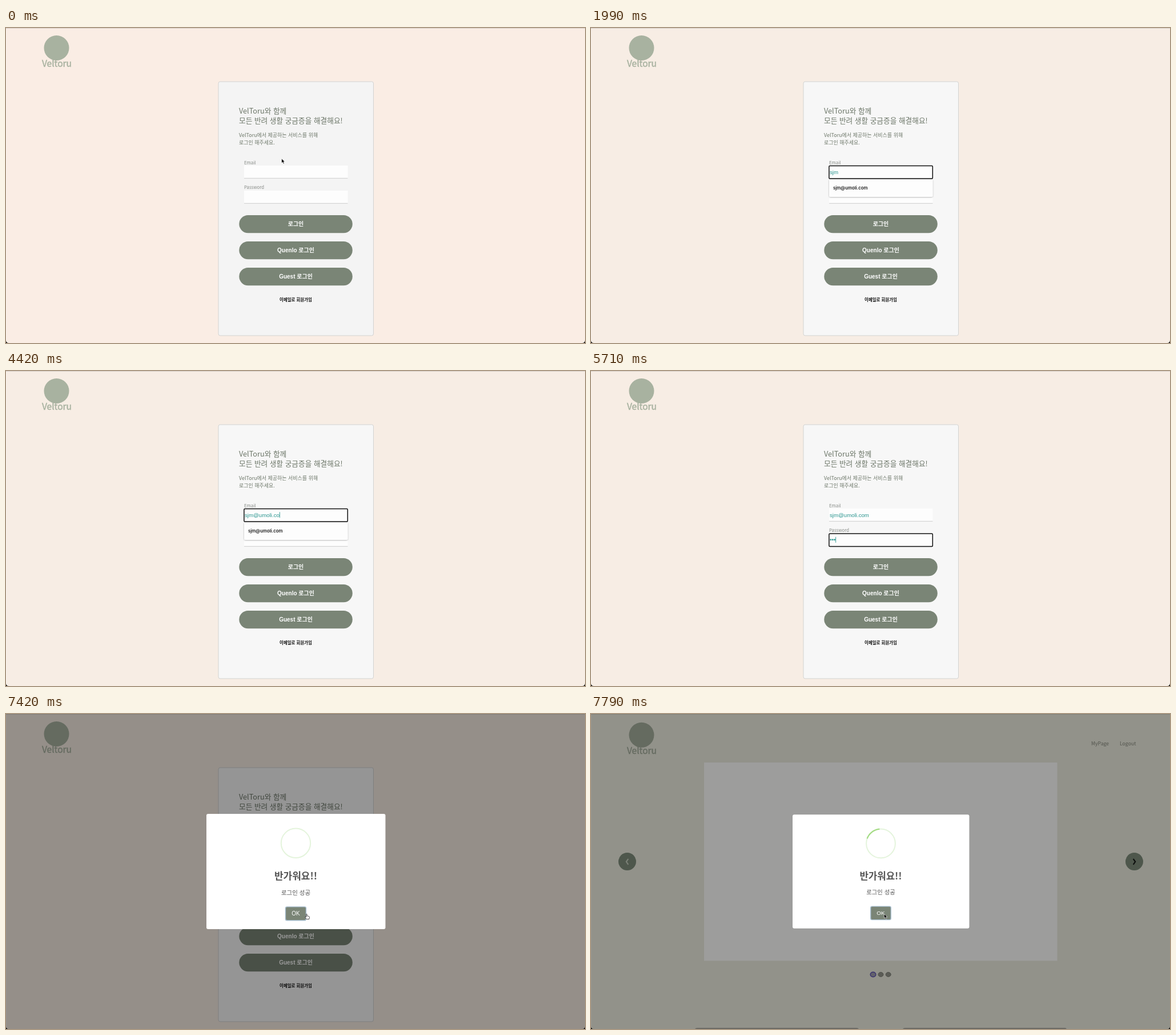
An HTML page for the animation above (7.99 s loop, 1014 by 552 pixels).

```html
<!DOCTYPE html>
<html lang="ko">
<head>
<meta charset="utf-8">
<title>Login</title>
<style>
  html, body { margin: 0; width: 100%; height: 100%; overflow: hidden; background: #000; }
  svg { display: block; width: 1014px; height: 552px; }
  text { font-family: "Noto Sans CJK KR", "Noto Sans CJK", "Noto Sans", sans-serif; white-space: pre; }
  .mid { text-anchor: middle; }
  .head { font-size: 12.7px; fill: #6d7769; }
  .sub { font-size: 8.97px; fill: #6d7769; }
  .label { font-size: 7.8px; fill: #868a86; }
  .btn { font: bold 10px "Liberation Sans", "Noto Sans CJK KR", "Noto Sans CJK", sans-serif; fill: #fff; }
  .typed { font: 9.68px "Liberation Sans", sans-serif; fill: #2a958f; }
  .item { font: 600 7.8px Inter, sans-serif; fill: #1c1c1c; }
  .nav { font-size: 8.7px; fill: #52544d; }
</style>
</head>
<body>
<svg viewBox="0 0 1014 552">
  <defs>
    <filter id="soft" x="-10%" y="-20%" width="120%" height="150%">
      <feDropShadow dx="0" dy=".6" stdDeviation=".9" flood-opacity=".35"/>
    </filter>
    <clipPath id="win"><path d="M0 0H1014V547Q1014 552 1009 552H5Q0 552 0 547Z"/></clipPath>
  </defs>
  <rect width="1014" height="552" fill="#000"/>
  <g clip-path="url(#win)">
    <rect id="bg" width="1014" height="552"/>
    <path d="M0 .5H1014" stroke="#000" stroke-opacity=".13"/>
    <path d="M.5 1V552" stroke="#fff" stroke-opacity=".4"/>

    <g id="logo" fill="#a8b2a0">
      <circle cx="88.5" cy="35" r="22"/>
      <text class="mid" x="89" y="68" font-size="15.5" stroke="#a8b2a0" stroke-width=".45">Veltoru</text>
    </g>

    <g id="login">
      <rect id="card" x="372" y="94" width="271.5" height="445" rx="3" stroke="#d2d3d2"/>
      <text class="head" x="408" y="150.3">VelToru와 함께</text>
      <text class="head" x="408" y="167.2">모든 반려 생활 궁금증을 해결해요!</text>
      <text class="sub" x="408" y="190.8">VelToru에서 제공하는 서비스를 위해</text>
      <text class="sub" x="408" y="204">로그인 해주세요.</text>
      <text class="label" x="417" y="238.8">Email</text>
      <text class="label" x="417" y="282.2">Password</text>
      <g id="fields"></g>
      <text id="mail" class="typed" x="418" y="255.6"></text>
      <g id="dots" fill="#2a958f"></g>
      <g id="buttons"></g>
      <text class="mid" x="507.5" y="478.9" font-size="7.45" font-weight="700" fill="#111">이메일로 회원가입</text>
      <g id="menu">
        <rect id="sheet" x="417" y="265" width="181.5" rx="2.5" fill="#fdfdfd" filter="url(#soft)"/>
        <g id="items"></g>
      </g>
      <rect id="ring" x="416.9" width="181.4" height="22.5" rx="1.5" fill="none" stroke="#101010" stroke-width="1.5"/>
      <rect id="caret" width=".9" height="10" fill="#2a958f"/>
    </g>

    <rect id="shade" width="1014" height="552" fill="#000" fill-opacity=".4"/>

    <rect id="panel" x="198" y="85" width="618.5" height="347.5" fill="#9d9d9c"/>
    <g id="home">
      <text class="nav" x="876" y="55.2">MyPage</text>
      <text class="nav" x="926" y="55.2">Logout</text>
      <g fill="#4e574c">
        <circle cx="63.5" cy="258.5" r="15.5"/>
        <circle cx="951.5" cy="258.5" r="15.5"/>
      </g>
      <g fill="none" stroke-width="2.1">
        <path d="M65.3 253.8L61.8 258.8L65.3 263.8" stroke="#7b8077"/>
        <path d="M949.7 253.8L953.2 258.8L949.7 263.8" stroke="#0d0f0d"/>
      </g>
      <g fill="#5b5c56" stroke="#4e504a">
        <ellipse cx="494" cy="456.5" rx="4.8" ry="4.2" fill="#62616b" stroke="#37306f" stroke-width="1.4"/>
        <ellipse cx="507.5" cy="456.5" rx="4.5" ry="3.9"/>
        <ellipse cx="520.7" cy="456.5" rx="4.5" ry="3.9"/>
      </g>
      <path d="M182 552Q183 550 186 550H465Q468 550 469 552ZM546 552Q547 550 550 550H830Q832 550 833 552Z" fill="#6b6a65"/>
    </g>

    <g id="modal">
      <rect x="351" y="175" width="313.5" height="202" rx="3" fill="#fff"/>
      <circle cx="507.5" cy="226.3" r="25.7" fill="none" stroke="#e4f4dc" stroke-width="2"/>
      <path id="arc" d="M483.3 217.6A25.7 25.7 0 0 1 505.3 200.7" fill="none" stroke="#a5dc86" stroke-width="2.3"/>
      <text class="mid" x="507.5" y="290.2" font-size="17" font-weight="700" fill="#555">반가워요!!</text>
      <text class="mid" x="507.5" y="316.9" font-size="10.5" fill="#545454">로그인 성공</text>
      <rect x="488.8" y="337.2" width="37.4" height="25.2" rx="3" fill="#a9bfd0"/>
      <rect x="490.2" y="338.6" width="34.6" height="22.4" rx="2" fill="#7a8576"/>
      <text class="mid" x="507.5" y="353.4" style="font:10px 'Liberation Sans',sans-serif" fill="#fff">OK</text>
    </g>

    <path id="arrow" d="M0 0V7.6L1.8 6L3.1 9L4.5 8.4L3.2 5.5H5.5Z" fill="#000" stroke="#fff" stroke-width=".6"/>
    <path id="beam" d="M-1.5 -5Q0 -5 0 -4Q0 -5 1.5 -5M0 -4V4M-1.5 5Q0 5 0 4Q0 5 1.5 5" fill="none" stroke="#333" stroke-width=".8"/>
    <path id="hand" d="M-1.4 1V-4.2Q-.7 -5.2 0 -4.2V-1.2L3.4 -.4Q4.6 0 4.3 1.4L3.6 4.6H-.8L-3.4 1.2Q-3.3 0 -2.2 .3Z" fill="#fff" stroke="#222" stroke-width=".8" stroke-linejoin="round"/>
  </g>
</svg>
<script>
const LOOP = 7990;
const $ = id => document.getElementById(id);
const show = (id, on) => $(id).setAttribute('display', on ? 'inline' : 'none');
const set = (id, attrs) => { for (const k in attrs) $(id).setAttribute(k, attrs[k]); };
const showFirst = (id, n) =>
  [...$(id).children].forEach((d, i) => d.setAttribute('display', i < n ? 'inline' : 'none'));
const within = (t, a, b) => t >= a && t < b;
// Latest [time, ...values] step that has begun
const at = (steps, t) => steps.filter(s => s[0] <= t).pop();

const ADDRESS = 'sjm@umoli.com';
const PEOPLE = ['sjm', 'sdc', 'hana7', 'borim', 'tester', 'dalbit'];

const CHARS = [[0, 0], [990, 1], [1270, 2], [1420, 3], [2560, 4], [3140, 5], [3270, 6], [3420, 7],
  [3710, 8], [3990, 9], [4140, 10], [4420, 12], [4560, 13]];
const DOTS = [[0, 0], [5270, 1], [5420, 2], [5710, 3], [5990, 4], [6140, 5]];
const ROWS = [[0, 0], [270, 6], [990, 2], [1270, 1], [4710, 0]];
const CARET_OFF = [[710, 990], [1990, 2420], [6710, 7130]];
const SCALE = [[0, 1], [7560, 0.94], [7710, 0.987]];
const POINTER = [[0, 'arrow', 482.7, 229], [140, 'beam', 484, 246], [990, ''],
  [6850, 'arrow', 494, 272], [6990, 'arrow', 514, 322], [7130, 'arrow', 525, 346],
  [7270, 'arrow', 527, 349.3], [7420, 'hand', 527.2, 355], [7710, 'arrow', 513.4, 350.3]];

$('fields').innerHTML = [241, 285].map(y =>
  `<rect x="417" y="${y}" width="181.5" height="22.5" fill="#fdfdfd"/>
   <rect x="417" y="${y + 21.8}" width="181.5" height=".9" fill="#c6c7c6"/>`).join('');
$('buttons').innerHTML = ['로그인', 'Quenlo 로그인', 'Guest 로그인'].map((s, i) => {
  const y = 328 + 46 * i;
  return `<rect x="408.3" y="${y}" width="198.5" height="31.2" rx="15.6" fill="#7a8576"/>
    <text class="btn mid" x="507.5" y="${y + 18.6}">${s}</text>`;
}).join('');
$('items').innerHTML = PEOPLE.map((s, i) =>
  `<text class="item" x="424" y="${283.3 + 21.5 * i}">${s}@umoli.com</text>`).join('');
$('dots').innerHTML = [0, 1, 2, 3, 4].map(i =>
  `<circle cx="${419.8 + 3.4 * i}" cy="295.7" r="1.35"/>`).join('');

function drawForm(t) {
  const count = at(DOTS, t)[1], rows = at(ROWS, t)[1];
  $('mail').textContent = ADDRESS.slice(0, at(CHARS, t)[1]);
  showFirst('dots', count);

  show('menu', rows > 0);
  set('sheet', { height: 9.5 + 21.5 * rows });
  showFirst('items', rows);

  const second = t >= 4710, focus = within(t, 140, 7270);
  show('ring', focus);
  set('ring', { y: second ? 285 : 241.6 });
  show('caret', focus && !CARET_OFF.some(([a, b]) => within(t, a, b)));
  const x = second ? 418 + 3.4 * count
    : 418 + ($('mail').textContent ? $('mail').getComputedTextLength() : 0);
  set('caret', { x, y: second ? 290.8 : 247.2 });
}

function draw(t) {
  const modal = t >= 7420, left = t >= 7710, home = t >= 7790;
  set('bg', { fill: left ? '#f3f2e6' : t < 140 ? '#faede4' : '#f7ede4' });
  set('card', { fill: t < 140 ? '#f4f4f4' : '#f7f7f7' });
  set('logo', { transform: `translate(0 ${home ? 1.8 : 0})` });
  show('login', !left);
  if (!left) drawForm(t);
  show('shade', modal);
  show('panel', left);
  show('home', home);
  show('modal', modal);
  show('arc', home);
  set('modal', { transform: `translate(507.5 276) scale(${at(SCALE, t)[1]}) translate(-507.5 -276)` });

  const [, kind, x, y] = at(POINTER, t);
  for (const id of ['arrow', 'beam', 'hand']) show(id, id === kind);
  if (kind) set(kind, { transform: `translate(${x} ${y})` });
}

const start = performance.now();
function tick() {
  draw((performance.now() - start) % LOOP);
  requestAnimationFrame(tick);
}
tick();
</script>
</body>
</html>
```
